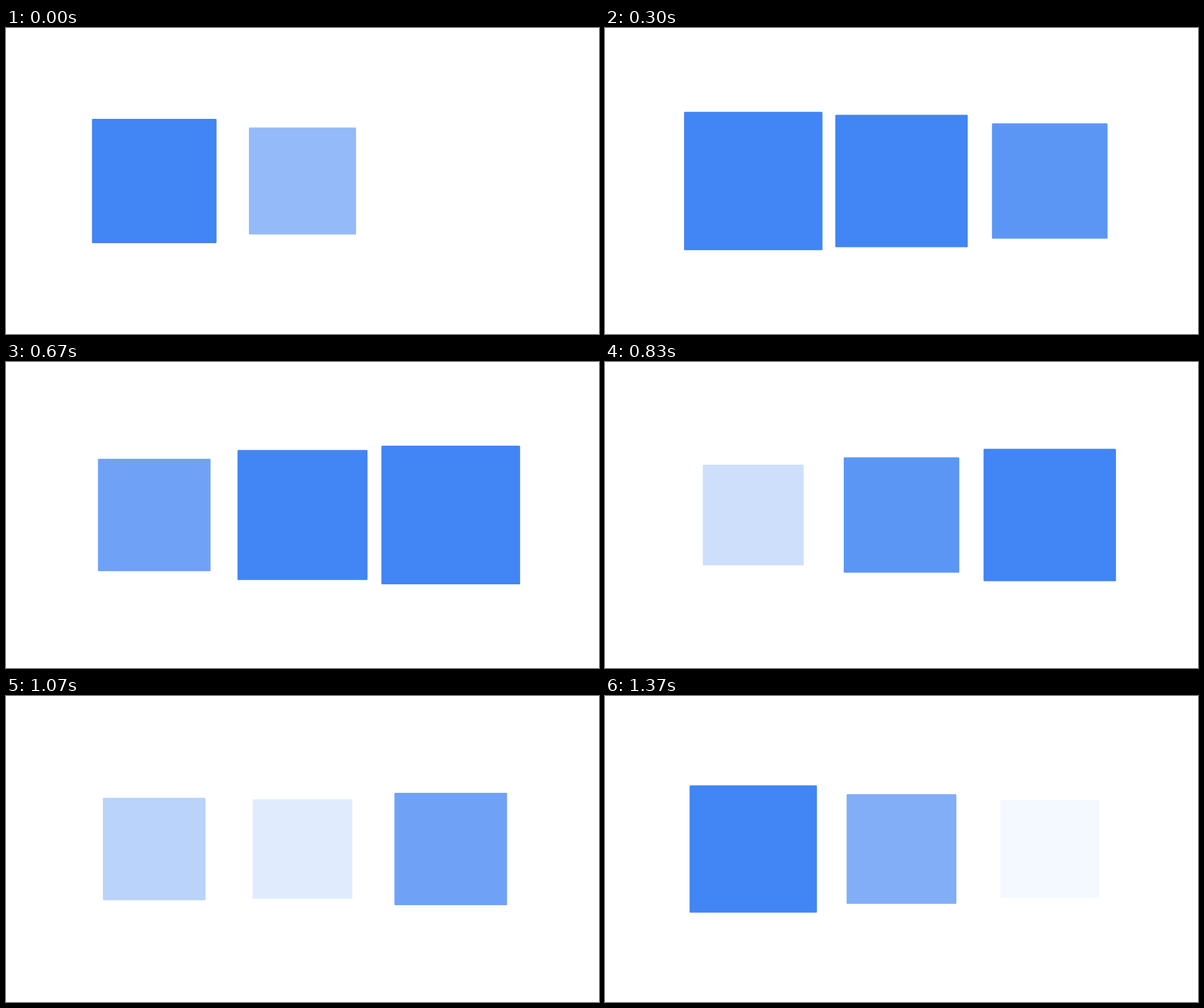
These frames come from a looping animation (991 px wide and 512 px high, 1400 ms). An HTML page with a canvas:

```html
<!DOCTYPE html>
<html lang="en">
<head>
<meta charset="utf-8">
<title>Pulsing squares</title>
<style>
  html, body { margin: 0; width: 100%; height: 100%; overflow: hidden; background: #fff; }
  canvas { display: block; }
</style>
</head>
<body>
<canvas id="stage" width="991" height="512"></canvas>
<script>
const ctx = document.getElementById('stage').getContext('2d');
const W = 991, H = 512;
const LOOP = 1400;                   // ms
const CYCLE = 40, HALF = 20;         // pulse length in steps
const PEAK = 8, DELAY = 6;           // first peak, lag between squares
const FADE_START = 0.4, FADE = 10;   // steps from invisible to solid
const MIN = 164.5, MAX = 231.8;

const clamp = x => Math.min(1, Math.max(0, x));
const smooth = x => x * x * (3 - 2 * x);

// 30 steps per second, on a 10 ms grid
function stepAt(ms) {
  const rest = ms % 100;
  return 3 * Math.floor(ms / 100) + (rest >= 30) + (rest >= 70);
}

function drawSquare(index, step) {
  const phase = (step - PEAK - index * DELAY + 2 * CYCLE) % CYCLE;
  const rise = Math.abs(phase - HALF);
  const size = MIN + (MAX - MIN) * smooth(rise / HALF);
  ctx.globalAlpha = clamp((rise - FADE_START) / FADE);
  ctx.beginPath();
  ctx.roundRect(W * (index + 1) / 4 - size / 2, (H - size) / 2, size, size, 1.5);
  ctx.fill();
}

function draw(ms) {
  const step = stepAt(ms % LOOP);
  ctx.clearRect(0, 0, W, H);
  ctx.fillStyle = '#4285f4';
  for (let i = 0; i < 3; i++) drawSquare(i, step);
}

const start = performance.now();
function tick() {
  draw(performance.now() - start);
  requestAnimationFrame(tick);
}
tick();
</script>
</body>
</html>
```
